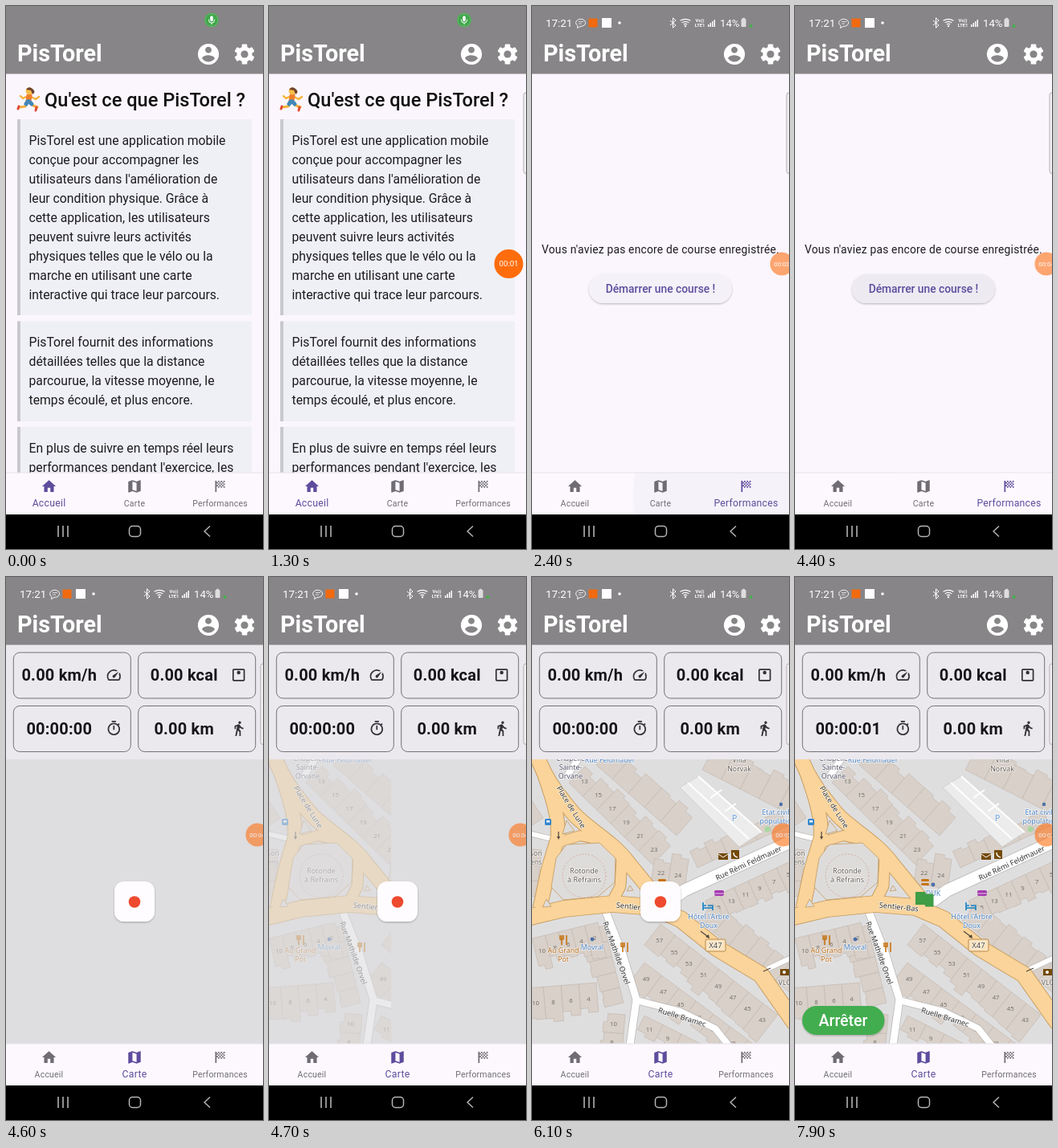
Write an HTML page that moves like this. It is 320 px wide and 676 px high and loops after 8000 ms.

```html
<!DOCTYPE html>
<html lang="fr">
<head>
<meta charset="utf-8">
<title>PisTorel</title>
<style>
html, body { margin: 0; width: 100%; height: 100%; overflow: hidden; background: #000; }
svg { display: block; width: 100%; height: 100%; font-family: Roboto, sans-serif; }
.map text { font-family: "Noto Sans", sans-serif; paint-order: stroke; stroke: #fffb; stroke-width: 1.6px; stroke-linejoin: round; }
.map .num { stroke: none; }
</style>
</head>
<body>
<svg id="stage" viewBox="0 0 320 676"></svg>
<script>
const stage = document.getElementById('stage');
const APP = 'PisTorel', GREY = '#878587', INK = '#1d1b20', VIOLET = '#5d4d9d';

// Drawing helpers
const text = (s, x, y, size, fill = INK, attrs = '') =>
  `<text x="${x}" y="${y}" font-size="${size}" fill="${fill}" ${attrs}>${s}</text>`;
const mid = 'text-anchor="middle"';
const bold = 'font-weight="700" ' + mid;
const rect = (x, y, w, h, fill, attrs = '') =>
  `<rect x="${x}" y="${y}" width="${w}" height="${h}" fill="${fill}" ${attrs}/>`;
const circle = (x, y, r, fill, attrs = '') => `<circle cx="${x}" cy="${y}" r="${r}" fill="${fill}" ${attrs}/>`;
const line = (d, color, w, attrs = '') =>
  `<path d="${d}" fill="none" stroke="${color}" stroke-width="${w}" stroke-linejoin="round" ${attrs}/>`;
const shape = (d, fill, attrs = '') => `<path d="${d}" fill="${fill}" ${attrs}/>`;
const group = (id, body, attrs = '') => `<g id="${id}" ${attrs}>${body}</g>`;
// Icon on a 24 unit grid, centred on x, y
const icon = (d, x, y, k, fill) =>
  `<path d="${d}" fill="${fill}" fill-rule="evenodd" transform="translate(${x} ${y}) scale(${k}) translate(-12 -12)"/>`;

const ICONS = {
  home: 'M10 20v-6h4v6h5v-8h3L12 3 2 12h3v8z',
  map: 'M20.5 3l-.16.03L15 5.1 9 3 3.36 4.9c-.21.07-.36.25-.36.48V20.5c0 .28.22.5.5.5l.16-.03L9 18.9l6 2.1 5.64-1.9c.21-.07.36-.25.36-.48V3.5c0-.28-.22-.5-.5-.5zM15 19l-6-2.11V5l6 2.11z',
  flag: 'M11 6H9V4h2zM15 4h-2v2h2zM9 14h2v-2H9zM19 10V8h-2v2zM19 14v-2h-2v2zM13 14h2v-2h-2zM19 4h-2v2h2zM13 8V6h-2v2zM7 10V8h2V6H7V4H5v16h2v-8h2v-2zM15 12h2v-2h-2zM11 10v2h2v-2zM9 8v2h2V8zM13 10h2V8h-2zM15 6v2h2V6z',
  user: 'M12 2C6.48 2 2 6.48 2 12s4.48 10 10 10 10-4.48 10-10S17.52 2 12 2zm0 3c1.66 0 3 1.34 3 3s-1.34 3-3 3-3-1.34-3-3 1.34-3 3-3zm0 14.2c-2.5 0-4.71-1.28-6-3.22.03-1.99 4-3.08 6-3.08 1.99 0 5.97 1.09 6 3.08-1.29 1.94-3.5 3.22-6 3.22z',
  speed: 'M20.38 8.57l-1.23 1.85a8 8 0 0 1-.22 7.58H5.07A8 8 0 0 1 15.58 6.85l1.85-1.23A10 10 0 0 0 3.35 19a2 2 0 0 0 1.72 1h13.85a2 2 0 0 0 1.74-1 10 10 0 0 0-.27-10.44zm-9.79 6.84a2 2 0 0 0 2.83 0l5.66-8.49-8.49 5.66a2 2 0 0 0 0 2.83z',
  scale: 'M5 3h14a2 2 0 0 1 2 2v14a2 2 0 0 1-2 2H5a2 2 0 0 1-2-2V5a2 2 0 0 1 2-2zM5 5v14h14V5zM12 6a2.6 2.6 0 1 1 0 5.2 2.6 2.6 0 0 1 0-5.2z',
  timer: 'M15 1H9v2h6zm-4 13h2V8h-2zm8.03-6.61l1.42-1.42c-.43-.51-.9-.99-1.41-1.41l-1.42 1.42A9 9 0 1 0 19.03 7.39zM12 20a7 7 0 1 1 0-14 7 7 0 0 1 0 14z',
  walk: 'M13.5 5.5a2 2 0 1 0 0-4 2 2 0 0 0 0 4zM9.8 8.9L7 23h2.1l1.8-8 2.1 2v6h2v-7.5l-2.1-2 .6-3C14.8 12 16.8 13 19 13v-2c-1.9 0-3.5-1-4.3-2.4l-1-1.6c-.4-.6-1-1-1.7-1-.3 0-.5.1-.8.1L6 8.3V13h2V9.6z'
};

function appBar() {
  const teeth = [0, 60, 120].map(a =>
    rect(-3.3, -12.6, 6.6, 25.2, '#fff', `rx="1.2" transform="rotate(${a})"`)).join('');
  return rect(0, 0, 320, 84.5, GREY) + text(APP, 14, 69, 28.8, '#fff', 'font-weight="700"') +
    icon(ICONS.user, 252, 60, 1.31, '#fff') +
    `<g transform="translate(297 60)">${teeth}${circle(0, 0, 9.6, '#fff')}${circle(0, 0, 4.6, GREY)}</g>`;
}

function statusBar() {
  const bars = [3, 5, 7, 9].map((h, i) => rect(219 + i * 2.5, 26 - h, 1.5, h, '#fff')).join('');
  const waves = [3, 6, 9].map(r =>
    line(`M${191 - r * .72} ${25.5 - r * .8}Q191 ${24.5 - r * 1.1} ${191 + r * .72} ${25.5 - r * .8}`, '#fff', 1.2)).join('');
  return text('17:21', 17, 25.5, 13.4, '#fff') +
    line('M57 24.5A6 4.6 0 1 1 60 25.4L56.5 27.5Z', '#fff', .9) + line('M58 19.5h6M58 22h4', '#fff', .7) +
    rect(70.5, 15.5, 11, 11, '#f26a10') + rect(87, 15, 12, 12, '#fff') + circle(109, 21, 1.8, '#fff') +
    line('M172 18l7 6-3.5 3.2v-12.4l3.5 3.2-7 6', '#fff', 1) + waves + circle(191, 25, 1.2, '#fff') +
    text('Vo))', 209, 20, 5.8, '#fff', bold) + text('LTE1', 209, 26, 5.8, '#fff', bold) + bars +
    text('14%', 234, 25.5, 13.2, '#fff') + rect(260.5, 16, 6, 10, '#ddd', 'rx="1"') +
    rect(262, 14.8, 3, 2, '#ddd') + circle(272.5, 25, 2, '#42b14b');
}

function runner() {
  const cap = 'stroke-linecap="round"';
  return line('M27 119l-3 6-7 1', '#f4b33b', 3, cap) + line('M29 120l5 4 5 2', '#f4b33b', 3, cap) +
    line('M31 113l6 3 4-3M27 112l-6 3-3-3', '#f4b33b', 2.4, cap) +
    line('M29 112l-1 6', '#ef7d2d', 7, cap) + line('M27 119l-2 3M29 119l3 3', '#4187b8', 5, cap) +
    line('M16 125l-1 3M38 126l-1 4', '#df4b38', 3, cap) +
    circle(29, 106, 4.4, '#f7bd48') + shape('M25 104q3-5 8-1t0 7l-2-5z', '#70432c');
}

function homePage() {
  const paras = [
    [141, 244, `${APP} est une application mobile|conçue pour accompagner les|utilisateurs dans l'amélioration de|leur condition physique. Grâce à|cette application, les utilisateurs|peuvent suivre leurs activités|physiques telles que le vélo ou la|marche en utilisant une carte|interactive qui trace leur parcours.`],
    [392.5, 124.5, `${APP} fournit des informations|détaillées telles que la distance|parcourue, la vitesse moyenne, le|temps écoulé, et plus encore.`],
    [524, 80, `En plus de suivre en temps réel leurs|performances pendant l'exercice, les`]
  ];
  return runner() + text(`Qu'est ce que ${APP} ?`, 48, 125, 23.6, '#111', 'font-weight="500"') +
    paras.map(([y, h, s]) => rect(14, y, 292, h, '#eff0f5') + rect(14, y, 4, h, '#c9c8ce') +
      s.split('|').map((l, i) => text(l, 28.5, y + 31.5 + i * 24, 15.75)).join('')).join('');
}

function emptyPage() {
  return text("Vous n'aviez pas encore de course enregistrée.", 160, 307.6, 13.8, INK, mid + ' letter-spacing=".22"') +
    rect(71, 334, 178, 36, '#f5f1f9', 'rx="18" filter="url(#shadow)"') +
    rect(71, 334, 178, 36, '#4b4458', 'rx="18" id="press" opacity="0"') +
    text('Démarrer une course !', 160, 356.5, 13.8, VIOLET, mid + ' font-weight="500"');
}

let seed = 7;
const rnd = () => (seed = seed * 16807 % 2147483647) / 2147483647;

// Terrace of n houses whose back lies to the left of the direction of travel
function row(x1, y1, x2, y2, n, depth, num) {
  const len = Math.hypot(x2 - x1, y2 - y1), ux = (x2 - x1) / len, uy = (y2 - y1) / len, w = len / n;
  const at = (a, d) => `${(x1 + ux * a + uy * d).toFixed(1)} ${(y1 + uy * a - ux * d).toFixed(1)}`;
  let out = '';
  for (let i = 0; i < n; i++) {
    const a = i * w, b = a + w, d = depth * (.75 + rnd() * .3), e = d - 6 * rnd(), m = a + w * .55;
    out += shape(`M${at(a, 0)}L${at(a, d)}L${at(m, d)}L${at(m, e)}L${at(b, e)}L${at(b, 0)}Z`, '#d8d0c9', 'stroke="#c3b9b0" stroke-width=".7"');
    const [x, y] = at(a + w / 2, depth * .4).split(' ');
    if (num) out += text(num + i * 2, x, +y + 3, 7.8, '#77716c', mid + ' class="num"');
  }
  return out;
}

function cityMap() {
  const houses = [
    [46, 256, 150, 358, 6, 38, 13], [80, 234, 180, 322, 5, 34], [148, 382, 190, 388, 2, 40, 22],
    [206, 362, 318, 310, 6, 24], [212, 240, 330, 300, 5, 44], [322, 354, 216, 403, 6, 34, 5],
    [208, 428, 322, 518, 6, 32], [306, 545, 160, 432, 8, 42, 43], [290, 592, 140, 480, 7, 36, 37],
    [114, 530, 90, 434, 5, 32], [82, 430, 0, 450, 5, 44, 2], [80, 505, -8, 512, 4, 48, 4],
    [112, 592, 116, 545, 2, 34, 8], [232, 592, 140, 546, 4, 30, 5], [6, 398, 12, 340, 3, 30], [-4, 312, 14, 300, 1, 30]
  ].map(a => row(...a)).join('');
  const white = [
    ['M90 412L113 470L130 526L121 590', 9], ['M130 527L185 541L228 562L252 592', 8],
    ['M165 408L190 390L330 326', 15], ['M278 495L325 473', 6], ['M42 250L62 220', 8], ['M-4 319L25 326', 6]
  ];
  const amber = [
    ['M5 218C13 246 30 268 48 290C62 310 100 328 120 356L160 405', 18],
    ['M12 236C26 275 34 300 32 325L20 365L10 412', 17],
    ['M28 332L60 322L88 328', 12], ['M112 348L110 385L98 408', 13],
    ['M-6 424L40 413L100 407L150 411L185 426L230 462L285 495L328 556', 20]
  ];
  const roads = (list, edge, fill) => list.map(([d, w]) => line(d, edge, w + 1.8)).join('') +
    list.map(([d, w]) => line(d, fill, w)).join('');
  const turn = (s, x, y, a, size = 9.2) =>
    text(s, 0, 0, size, '#333', `${mid} transform="translate(${x} ${y}) rotate(${a})"`);
  const label = (s, x, y, fill, size = 8.8) => s.split('|').map((l, i) => text(l, x, y + i * 11, size, fill, mid)).join('');
  const fork = (x, y) => line(`M${x - 4} ${y - 6}v5h4v-5M${x - 2} ${y - 6}v12M${x + 4} ${y - 6}v12`, '#c77414', 1.6);
  const island = 'fill="none" stroke="#c49a5d" stroke-width=".7"';
  const blue = '#4a83c4', dark = '#675f59', navy = '#55556c';
  return rect(0, 227, 320, 355, '#dfdedf') + houses +
    shape('M184 262L207 248L286 318L258 336Z', '#ececec', 'stroke="#c8c5c4" stroke-width=".7"') +
    line('M194 256L270 326M207 248L286 318M222 275l14-10M240 292l14-10', '#fff', 2) +
    roads(white, '#c1bcb9', '#fff') + roads(amber, '#c49a5d', '#fad49a') +
    shape('M43 333L84 331L104 350L103 380L82 398L39 402L24 386L30 350ZM43 303l10 13-15 4zM118 391l4-7 4 6zM13 411l5-10 6 9z',
      '#dedcda', 'stroke="#c49a5d" stroke-width=".8"') +
    circle(65, 372, 27, 'none', 'stroke="#d5aaa4" stroke-dasharray="2 2"') +
    line('M33 317v8M210 441l8 6M288 491l9-4', '#51483d', 1.2) +
    shape('M31 323h4l-2 4zM216 448l4-3 1 5z', '#51483d') +
    turn('Place de Lune', 46, 288, 58) + turn('Rue Rémi Feldmauer', 271, 359, -25) +
    turn('Rue Mathilde Orvel', 102, 469, 70) + turn('Ruelle Bramec', 186, 551, 17) + turn('Sentier-Bas', 129, 414, 6) +
    label('Chapelle|Sainte-|Orvane', 48, 229, navy) + label('Rue Feldmauer', 97, 231, blue) +
    label('Rotonde|à Refrains', 65, 369, dark, 9) + label('son|ens', 5, 347, dark) +
    label('Villa|Norvak', 258, 231, dark) + label('Etat civil -|population', 306, 296, blue) +
    label('Au Grand|Pot', 39, 468, '#b56b18') + label('Movral', 75, 464, blue) +
    label("Hôtel l'Arbre|Doux", 220, 426, blue) + label('DUK', 172, 397, blue) + label('VLO', 315, 508, dark) +
    label('P', 252, 304, '#6c9edb', 11) +
    rect(216, 451, 25, 15, '#fbe3bd', 'rx="2" stroke="#b98a4c"') + text('X47', 228.5, 462, 9.5, '#4d443a', mid) +
    fork(39, 452) + fork(115, 461) + rect(16, 301, 8, 8, '#3487cc', 'rx="1.5"') + rect(18, 303, 4, 2.5, '#fff') +
    rect(232, 344, 12, 8, '#734a08') + line('M232 345l6 4 6-4', '#fff', 1) + rect(248, 340, 10, 11, '#734a08') +
    line('M251 343q0 5 5 6', '#fff', 1.4) + line('M213 405v10m0-3h12v3m-12-6h4m2 0h6v3', '#1680c2', 1.6) +
    rect(227, 390, 12, 7, '#a53ab0', 'rx="2"') + line('M227 394h12', '#e3c9e3', 1) +
    rect(157, 376, 10, 3, '#c77414', 'rx="1.5"') + rect(157, 381, 10, 3, '#c77414', 'rx="1.5"') +
    rect(309, 488, 11, 8, '#734a08') + circle(314, 492, 2, '#fff') + circle(293, 314, 3.5, '#a7d7a0') +
    circle(75, 451, 2.4, '#4b6ea8') + circle(172, 383, 2.4, '#4b6ea8') + circle(310, 283, 2.2, '#4b6ea8');
}

function card(x, y, id, value, iconName) {
  return rect(x, y + .5, 146, 57, 'none', 'rx="8" stroke="#747277"') +
    text(value, x + 57, y + 35.5, 20, '#161419', `${bold} letter-spacing=".2" id="${id}"`) +
    icon(ICONS[iconName], x + 125, y + 28.5, .86, '#323035');
}

function mapPage() {
  const tile = (id, side) => `<use id="${id}" href="#city" clip-path="url(#${side})"/>`;
  return rect(0, 227, 320, 355, '#dedddf') + tile('tileA', 'west') + tile('tileB', 'east') +
    rect(0, 84, 320, 143, '#ebe8ee') +
    card(9.3, 93.5, 'speed', '0.00 km/h', 'speed') + card(164.7, 93.5, 'energy', '0.00 kcal', 'scale') +
    card(9.3, 160, 'clock', '00:00:00', 'timer') + card(164.7, 160, 'dist', '0.00 km', 'walk') +
    group('record', rect(135, 379, 50, 50, '#fffcff', 'rx="12" filter="url(#shadow)"') +
      circle(160, 404.5, 24, '#d9cfe2', 'id="ripple" opacity="0"') + circle(160, 404.5, 7.3, '#ee4a2f')) +
    group('running', shape('M150 392h12l1 2.5h9.5v16h-10l-1-2.5h-11.5z', '#3f9d46') +
      rect(9, 534, 102.5, 36, '#43ad50', 'rx="18" filter="url(#shadow)"') +
      text('Arrêter', 60, 558.5, 19.5, '#fff', mid + ' font-weight="500"'));
}

const TABS = [['home', 'Accueil', 53.5], ['map', 'Carte', 160], ['flag', 'Performances', 266.5]];
function navBar() {
  return rect(0, 581, 320, 52, '#fcf8fe') + rect(0, 580.5, 320, 1, '#e8e4ea') +
    circle(266, 607, 10, '#605870', 'id="splash" clip-path="url(#nav)"') +
    TABS.map(([ic, name, x], i) => group('tab' + i, icon(ICONS[ic], x, 598, .86, 'inherit') +
      text(name, x, 622.5, 'inherit', 'inherit', mid + ' letter-spacing=".02em"'))).join('') +
    rect(0, 633, 320, 43, '#000') + line('M65 647v14M71 647v14M77 647v14', '#b2b2b2', 1.6) +
    rect(153.5, 647.5, 14, 13, 'none', 'rx="4" stroke="#b5b5b5" stroke-width="1.5"') + line('M254 647.5l-7 6.5 7 6.5', '#b5b5b5', 1.5);
}

const clip = (id, x, y, w, h) => `<clipPath id="${id}">${rect(x, y, w, h, '#000')}</clipPath>`;
stage.innerHTML = `<defs>
  <filter id="shadow" x="-30%" y="-30%" width="160%" height="180%"><feDropShadow dx="0" dy="1.1" stdDeviation="1.1" flood-opacity=".27"/></filter>
  ${clip('west', 0, 227, 152, 355)}${clip('east', 152, 227, 168, 355)}${clip('nav', 0, 581, 320, 52)}
  ${group('city', cityMap(), 'class="map"')}</defs>` +
  rect(0, 0, 320, 676, '#fbf6fd') + group('page0', homePage()) + group('page2', emptyPage()) + group('page1', mapPage()) +
  appBar() + group('status', statusBar()) +
  group('mic', circle(0, 0, 9, '#40a64b') + circle(0, 0, 8, 'none', 'stroke="#76c47c" stroke-width=".8"') +
    rect(-1.8, -5.3, 3.6, 7, '#fff', 'rx="1.8"') + line('M-3.6 -1v1a3.6 3.6 0 0 0 7.2 0v-1M0 3.6v2', '#fff', 1)) +
  navBar() +
  group('handle', rect(317, 108, 10, 100.5, '#f4f1f5', 'rx="3" stroke="#b0adb2"')) +
  group('bubble', circle(0, 0, 18, '#ff6c0c') + text('', 0, 3.4, 9.7, '#fff', mid + ' id="count"'));

const el = Object.fromEntries([...stage.querySelectorAll('[id]')].map(e => [e.id, e]));
const ramp = (t, a, b) => Math.min(1, Math.max(0, (t - a) / (b - a)));
const ease = (t, a, b) => { const p = ramp(t, a, b); return p * p * (3 - 2 * p); };
const alpha = (id, v) => el[id].setAttribute('opacity', v);
const show = (id, on) => { el[id].style.display = on ? '' : 'none'; };
const place = (id, x, y, k = 1) => el[id].setAttribute('transform', `translate(${x} ${y}) scale(${k})`);
const say = (id, s) => { if (el[id].textContent !== s) el[id].textContent = s; };

const LOOP = 8000, TO_STATS = 1700, TO_MAP = 4500, START = 6900;

function draw(ms) {
  const t = Math.floor(ms % LOOP / 100) * 100;
  const page = t < TO_STATS ? 0 : t < TO_MAP ? 2 : 1;
  for (const i of [0, 1, 2]) show('page' + i, page === i);

  // Tab label grows and takes the accent colour while selected
  const a = ramp(t, TO_STATS - 100, TO_STATS + 100), b = ramp(t, TO_MAP - 100, TO_MAP + 100);
  [1 - a, b, a - b].forEach((s, i) => {
    el['tab' + i].style.fontSize = 10.5 * (1 + s / 6) + 'px';
    el['tab' + i].style.fill = `color-mix(in srgb, ${VIOLET} ${s * 100}%, #6f6c73)`;
  });
  el.splash.setAttribute('r', 20 + 120 * ramp(t, 1600, 2300));
  alpha('splash', t < 1600 ? 0 : .09 * (1 - ramp(t, 1900, 2700)));

  // Microphone badge gives way to the status icons
  const gone = ease(t, 1700, 2200);
  place('mic', 256 - 13 * ease(t, 0, 600) + 29.5 * gone, 17.5 + 7.5 * gone, 1 - .78 * gone);
  alpha('mic', 1 - gone);
  alpha('status', ramp(t, 1900, 2300));

  // Recording bubble slides in, then shrinks and docks at the edge
  const enter = ease(t, 0, 600), dock = ease(t, 1900, 2400);
  place('bubble', 342 - 43.5 * enter + 12.5 * dock + 2 * ramp(t, 2400, 2600), 321, 1 - .19 * dock);
  alpha('bubble', 1 - .42 * dock);
  place('handle', 6 * (1 - enter), 0);
  say('count', '00:0' + Math.max(0, Math.floor((t - 300) / 1000)));

  alpha('press', .045 * ramp(t, 4200, 4400));
  alpha('tileA', ramp(t, 4600, 4900) ** .9);
  alpha('tileB', ramp(t, 4900, 5200));
  alpha('ripple', t >= 6800 ? .5 : 0);
  const on = t >= START;
  show('record', !on);
  show('running', on);
  say('clock', '00:00:0' + (on ? Math.floor((t - START) / 1000) : 0));
}

const begin = performance.now();
(function tick() {
  draw(performance.now() - begin);
  requestAnimationFrame(tick);
})();
</script>
</body>
</html>
```
